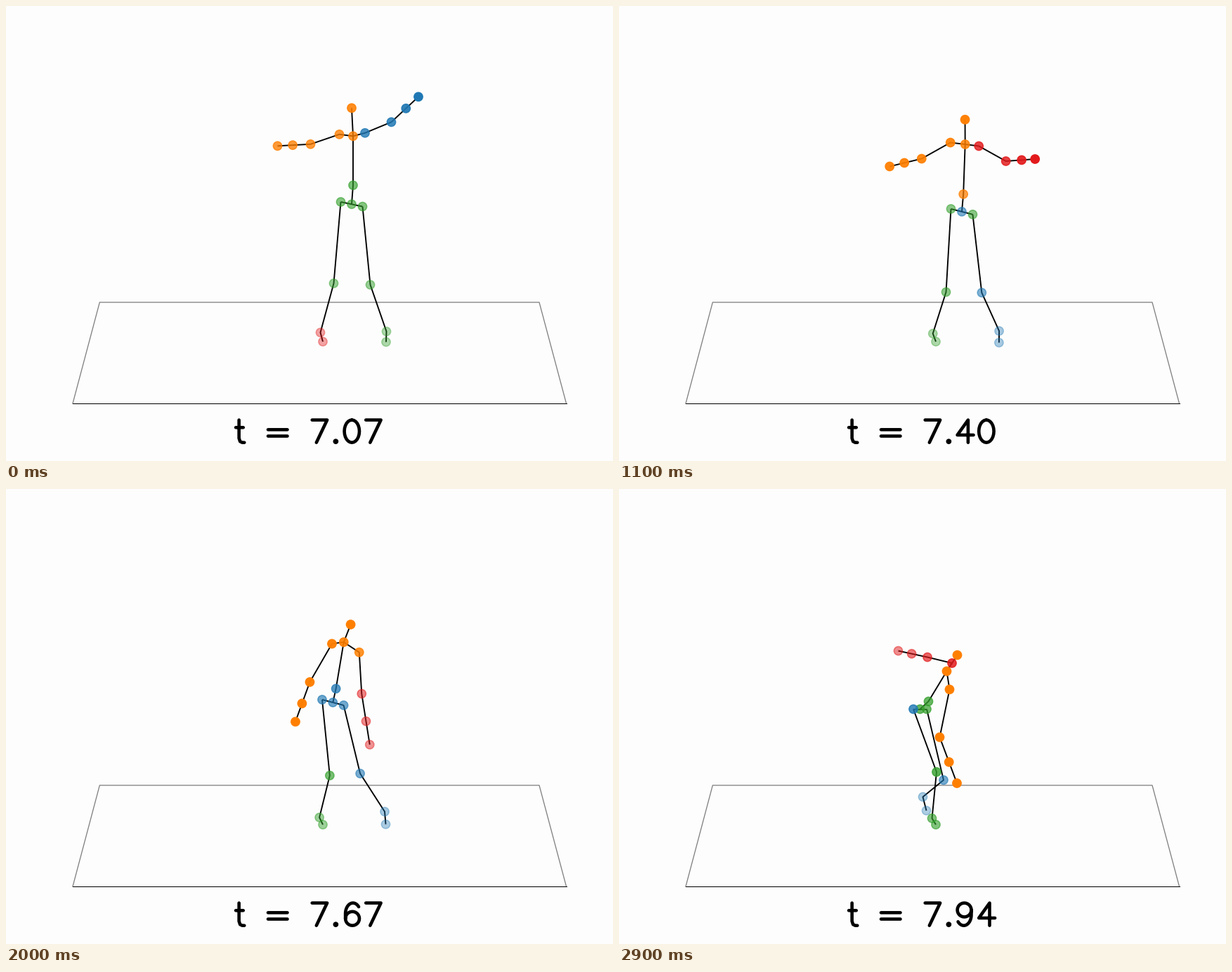
Write a matplotlib script that moves like this. It is 864 by 648 pixels and loops after 3000 ms.

```python
import numpy as np
import matplotlib.pyplot as plt
from matplotlib.animation import FuncAnimation
from matplotlib.collections import LineCollection
from matplotlib.colors import to_rgba

W, H, DPI = 864, 648, 72
FRAMES, INTERVAL = 30, 100
TIME = np.arange(FRAMES)
HUES = {"B": "#1f78b4", "G": "#33a02c", "R": "#e31a1c", "O": "#ff7f00"}


def ease(keys, values):
    """Smooth curve through a few keys that never overshoots them."""
    k, p = np.array(keys), np.array(values, float)
    if len(k) == 1:
        return np.full(FRAMES, p[0])
    h = np.diff(k)
    d = np.diff(p) / h
    left, right = np.r_[d[0], d], np.r_[d, d[-1]]
    cap = np.where(left * right > 0, 3 * np.minimum(abs(left), abs(right)), 0)
    cap = cap * np.sign(left)
    m = np.clip(np.gradient(p, k, edge_order=min(2, len(k) - 1)),
                np.minimum(cap, 0), np.maximum(cap, 0))
    j = np.clip(np.searchsorted(k, TIME, side="right") - 1, 0, len(h) - 1)
    u = (TIME - k[j]) / h[j]
    return ((1 + 2 * u) * (1 - u) ** 2 * p[j] + u * (1 - u) ** 2 * h[j] * m[j]
            + u * u * (3 - 2 * u) * p[j + 1] + u * u * (u - 1) * h[j] * m[j + 1])


paths, fades, hues = {}, {}, {}


def place(name, path, fade, hue):
    """fade: evenly spaced opacities; hue: colours, each with its first frame."""
    paths[name], hues[name] = path, hue
    fades[name] = np.interp(TIME, np.linspace(0, FRAMES - 1, len(fade)), fade)


def joint(name, parent, keys, fade, hue):
    """keys: frame -> offset from the parent joint (or from the stage corner)."""
    xs, ys = zip(*keys.values())
    path = np.column_stack([ease(list(keys), xs), ease(list(keys), ys)])
    place(name, path + paths.get(parent, 0), fade, hue)


def between(name, a, b, share, fade, hue):
    place(name, paths[a] + share * (paths[b] - paths[a]), fade, hue)


# Torso
joint("pelvis", None, {0: (492, 282.3), 5: (491, 283.5), 15: (481.5, 299.5),
                       20: (465.3, 304), 29: (428.5, 313.5)},
      (.6, .6, .75), "G B8 G23")
joint("hip_r", "pelvis", {0: (15.5, 3.3), 20: (15.3, 4), 29: (9.5, 0)},
      (.6, .58, .7), "G B13 G27")
between("hip_l", "hip_r", "pelvis", 2, (.6, .55, .82), "G B18")
joint("spine", "pelvis", {0: (2, -27), 15: (2.5, -23), 29: (12, -11)},
      (.65, .75, .75), "G O3 B18 G27")
joint("neck", "spine", {0: (0, -70), 15: (5.5, -71), 29: (26, -43)},
      (.78, .85, 1), "O")
joint("head", "neck", {0: (-2, -40), 15: (2.5, -32), 25: (15, -20.5), 29: (15, -23)},
      (.88, 1, 1), "O")

# Legs
joint("knee_l", None, {0: (466.5, 395), 15: (464, 408.5), 29: (452, 403)},
      (.5, .58, .8), "G B13 G18")
joint("knee_r", None, {0: (518.5, 397), 15: (513, 409), 25: (485.5, 401.5),
                       29: (462, 414.5)}, (.5, .58, .62), "G B8")
joint("ankle_l", None, {0: (447.5, 465), 29: (445.5, 469)}, (.4, .4, .62), "R G3")
joint("ankle_r", None, {0: (541.5, 463.5), 20: (539, 459.5), 25: (498, 450.5),
                        29: (432.5, 438.5)}, (.4, .38), "G B3")
joint("toe_l", None, {0: (451, 478)}, (.4, .4, .62), "R G3")
joint("toe_r", "ankle_r", {0: (-.5, 15), 20: (1.5, 18), 29: (5, 19.5)},
      (.4, .36), "G B3")

# Arms: the left one drops, the right one swings across behind
joint("shoulder_l", "neck", {0: (-19.5, -2.5), 15: (-21, -2.5), 29: (4, 26)},
      (.78, .95, 1), "O")
joint("elbow_l", "shoulder_l", {0: (-41, 14), 11: (-41, 23), 20: (-31.5, 54.5),
                                29: (-14, 68)}, (.78, .96, 1), "O")
joint("hand_l", "elbow_l", {0: (-47, 2.5), 11: (-45.5, 11), 20: (-20.5, 56.5),
                            25: (14, 72), 29: (24.5, 65.5)}, (.78, 1, 1), "O")
joint("shoulder_r", "neck", {0: (17, -4.5), 11: (19.5, 2.5), 20: (22, 14.5),
                             29: (7.5, -11.5)}, (.8, .85), "B R3 O13 R27")
joint("elbow_r", "shoulder_r", {0: (37.5, -15.5), 11: (38.5, 21.5), 15: (32.5, 47),
                                20: (3.5, 59), 25: (-28, 16.5), 29: (-35, -8.5)},
      (.85, .85, .82, .45, .68), "B R8")
joint("hand_r", "elbow_r", {0: (38.5, -36), 11: (41.5, -3), 15: (39, 30.5),
                            20: (11.5, 72.5), 25: (-33.5, 17), 29: (-41.5, -9)},
      (1, 1, 1, .3, .5), "B R8")
between("wrist_l", "elbow_l", "hand_l", .54, (.78, .98, 1), "O")
between("wrist_r", "elbow_r", "hand_r", .54, (.92, .92, .92, .38, .58), "B R3")

NAMES = list(paths)
BONES = [["head", "neck", "spine", "pelvis"], ["hip_l", "pelvis", "hip_r"]]
for side in "lr":
    BONES.append(["neck"] + [f"{n}_{side}" for n in ("shoulder", "elbow", "wrist", "hand")])
    BONES.append([f"{n}_{side}" for n in ("hip", "knee", "ankle", "toe")])


# Single-stroke lettering on a grid 21 units high
def arc(cx, cy, rx, ry, start, end):
    a = np.radians(np.linspace(start, end, 25))
    return np.column_stack([cx + rx * np.cos(a), cy + ry * np.sin(a)])


def stroke(*parts):
    return np.vstack([np.atleast_2d(p) for p in parts])


six = stroke(arc(11, 11, 7, 10, 40, 180), arc(10.5, 6.5, 6.5, 6.5, 180, 540))
GLYPHS = {
    "0": [arc(10, 10.5, 7, 10.5, 90, 450)],
    "1": [stroke((6, 17), (8, 18), (11, 21), (11, 0))],
    "2": [stroke(arc(10, 15.5, 6, 5.5, 175, -30), (13, 10), (3, 0), (17, 0))],
    "3": [stroke((5, 21), (16, 21), (10, 13), arc(10, 6.5, 7, 6.5, 90, -160))],
    "4": [stroke((13, 0), (13, 21), (3, 7), (18, 7))],
    "5": [stroke((15, 21), (5, 21), (4, 12), arc(10, 7, 7, 7, 140, -155))],
    "6": [six],
    "7": [stroke((3, 21), (17, 21), (7, 0))],
    "8": [arc(10, 16.75, 6, 4.25, 0, 360), arc(10, 6.25, 7, 6.25, 0, 360)],
    "9": [(20, 21) - six],
    "t": [stroke((5, 21), (5, 4), (6, 1), (8, 0), (10, 0)), stroke((2, 14), (9, 14))],
    "=": [stroke((4, 12), (22, 12)), stroke((4, 6), (22, 6))],
    ".": [arc(5, 1, 1, 1, 0, 360)],
    " ": [],
}
ADVANCE = {"t": 12, " ": 16, "=": 26, ".": 10}


def lettering(text, x, baseline, scale):
    gap, out = [[np.nan, np.nan]], []
    for ch in text:
        for line in GLYPHS[ch]:
            out += [line * (scale, -scale) + (x, baseline), gap]
        x += ADVANCE.get(ch, 20) * scale
    return np.vstack(out)


fig = plt.figure(figsize=(W / DPI, H / DPI), dpi=DPI, facecolor="#fdfdfd")
ax = fig.add_axes([0, 0, 1, 1])
ax.set_xlim(0, W)
ax.set_ylim(H, 0)
ax.axis("off")

ax.plot([95, 133.3, 759, 797.5], [566, 422, 422, 566], color="#808080", lw=1.3)
ax.plot([94.5, 798], [566, 566], color="black", lw=1)

bones = LineCollection([], colors="black", linewidths=1.9, zorder=3)
ax.add_collection(bones)
dots = ax.scatter([0] * len(NAMES), [0] * len(NAMES), s=150, linewidths=1.5, zorder=4)
label, = ax.plot([], [], color="black", lw=4.6, solid_capstyle="round",
                 solid_joinstyle="round")


def color(name, i):
    started = [c[0] for c in hues[name].split() if i >= int(c[1:] or 0)]
    return to_rgba(HUES[started[-1]], fades[name][i])


def draw(i):
    bones.set_segments([[paths[n][i] for n in chain] for chain in BONES])
    order = sorted(NAMES, key=lambda n: fades[n][i])    # far joints first
    colors = [color(n, i) for n in order]
    dots.set_offsets([paths[n][i] for n in order])
    dots.set_facecolor(colors)
    dots.set_edgecolor(colors)
    label.set_data(*lettering(f"t = {7.07 + 0.03 * i:.2f}", 324, 621.7, 1.53).T)
    return bones, dots, label


anim = FuncAnimation(fig, draw, frames=FRAMES, interval=INTERVAL, repeat=True,
                     repeat_delay=0)
plt.show()
```
